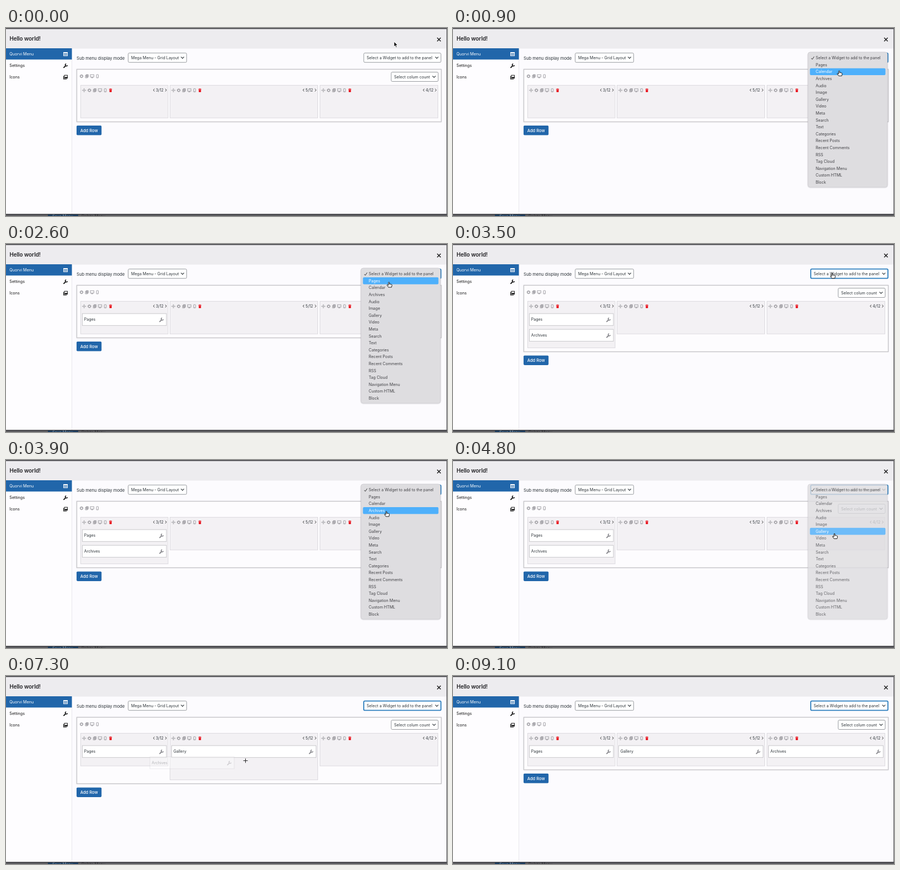
An HTML page for the animation above (9200 ms loop, 800 by 343 pixels).

```html
<!DOCTYPE html>
<html lang="en">
<head>
<meta charset="utf-8">
<title>Grid menu builder</title>
<style>
html, body { margin: 0; width: 100%; height: 100%; overflow: hidden; background: #fcfbfe; }
svg { display: block; width: 800px; height: 343px; font-family: Inter, "Open Sans", sans-serif; }
</style>
</head>
<body>
<svg id="stage" viewBox="0 0 800 343" xmlns="http://www.w3.org/2000/svg">
  <defs>
    <g id="gear" fill="none" stroke="#99989d">
      <circle r="2.1" stroke-width="1.2"/>
      <circle r="2.9" stroke-width="1" stroke-dasharray="1.15 1.13"/>
    </g>
    <g id="copy" fill="#b5b4b9" stroke="#919095" stroke-width=".8">
      <path d="M-1.2-3H2.6V1.6H-1.2Z"/>
      <path d="M-1.2-1.6H-2.6V3H1.2V1.6" fill="none"/>
    </g>
    <g id="screen" fill="none" stroke="#99989d" stroke-width=".9">
      <rect x="-3.2" y="-2.8" width="6.4" height="4.2"/>
      <path d="M0 1.4V2.8M-1.8 2.9H1.8"/>
    </g>
    <g id="phone" fill="none" stroke="#99989d" stroke-width=".9">
      <rect x="-1.8" y="-3" width="3.6" height="6" rx=".6"/>
      <path d="M-.5 1.9H.5"/>
    </g>
    <g id="grip" fill="none" stroke="#99989d" stroke-width=".8">
      <path d="M-3.2 0H3.2M0-3.2V3.2M-1-2.2L0-3.2L1-2.2M-1 2.2L0 3.2L1 2.2M-2.2-1L-3.2 0L-2.2 1M2.2-1L3.2 0L2.2 1"/>
    </g>
    <path id="bin" d="M-2.6-2.6H-1V-3.2H1V-2.6H2.6V-1.6H-2.6ZM-2.2-1.1H2.2L1.9 3.2H-1.9Z" fill="#e8121c"/>
    <g id="wrench" fill="none">
      <path d="M1.2-3.4A2 2 0 1 0 3.4-1.2" stroke-width="1.5"/>
      <path d="M.2-.2L-3.1 3.1" stroke-width="1.9" stroke-linecap="round"/>
    </g>
    <path id="arrow" d="M0 0V9L2.1 7.1L3.6 10.4L5.1 9.7L3.6 6.5H6.5Z" fill="#000" stroke="#fff" stroke-width=".8"/>
    <path id="hand" d="M-.9.8Q0-.5.9.8V4L2.2 3.7L3.5 4.1L4.8 4.5Q5.6 4.6 5.5 6L4.7 9.6H-.8L-3.4 6Q-3.6 4.6-2.3 5L-.9 6.2Z" fill="#fff" stroke="#000" stroke-width=".9" stroke-linejoin="round"/>
    <path id="move" d="M0-4.9L2-2.6H.7V-.7H2.6V-2L4.9 0L2.6 2V.7H.7V2.6H2L0 4.9L-2 2.6H-.7V.7H-2.6V2L-4.9 0L-2.6-2V-.7H-.7V-2.6H-2Z" fill="#000" stroke="#fff" stroke-width=".5"/>
    <path id="cross" d="M-4 0H4M0-4V4" stroke="#222" stroke-width="1"/>
  </defs>
  <g id="base"></g>
  <g id="live"></g>
</svg>
<script>
const LOOP = 9200, STEP = 100;
const PROMPT = "Select a Widget to add to the panel";
const OPTIONS = [PROMPT, "Pages", "Calendar", "Archives", "Audio", "Image", "Gallery", "Video", "Meta",
  "Search", "Text", "Categories", "Recent Posts", "Recent Comments", "RSS", "Tag Cloud",
  "Navigation Menu", "Custom HTML", "Block"];
const COLS = [
  { x: 135.5, r: 294, size: "3/12" },
  { x: 297.5, r: 565.5, size: "5/12" },
  { x: 569.5, r: 783.5, size: "4/12" }
];
const TOP = 104.5, PITCH = 28.7, ROW_TOP = 127;

// "-" is the empty slot under a dragged item
const LAYOUTS = [
  [0, "", "", ""], [2100, "P", "", ""], [3300, "PA", "", ""], [5300, "PAG", "", ""],
  [6000, "PA-", "", ""], [6200, "PA", "-", ""], [6500, "PA", "G", ""],
  [7000, "P-", "G", ""], [7300, "P", "G-", ""], [8100, "P", "G", "-"], [8300, "P", "G", "A"]
];
const NAMES = { P: "Pages", A: "Archives", G: "Gallery" };
const DRAGS = [
  { from: 6000, to: 6500, name: "Gallery", dx: 72, dy: 17 },
  { from: 7000, to: 8300, name: "Archives", dx: 72, dy: 10.5 }
];
const MENUS = [[600, 1500], [2300, 2800], [3700, 4700]];
const VALUES = [[0, PROMPT], [1600, "Pages"], [2100, PROMPT], [2900, "Archives"], [3300, PROMPT],
  [4900, "Gallery"], [5300, PROMPT]];
const PATH = [
  [0, 704, 25], [400, 702, 52], [600, 702, 53], [1000, 700, 86], [1300, 699, 67], [1500, 699, 67],
  [1700, 699, 54], [2300, 698, 54], [2500, 697, 58], [2800, 690, 92], [3000, 690, 92], [3400, 688, 53],
  [3700, 688, 53], [4100, 692, 134], [4900, 692, 134], [5500, 330, 185], [5800, 210, 201],
  [6000, 210, 201], [6200, 400, 152], [6500, 400, 150], [6900, 210, 166], [7000, 212, 166],
  [7200, 333, 158], [7300, 434.5, 154.5], [7700, 446, 152], [7900, 462, 150], [8200, 640, 146], [9200, 640, 146]
];
const POINTERS = [[0, "arrow"], [300, "hand"], [5100, "arrow"], [5700, "move"], [6100, "cross"], [6500, "move"],
  [7100, "cross"], [8300, "move"], [9000, ""]];

const at = (list, t) => list.filter(e => e[0] <= t).pop();
const rect = (x, y, r, b, fill, stroke = "none", w = 1, rx = 0, more = "") =>
  `<rect x="${x}" y="${y}" width="${r - x}" height="${b - y}" rx="${rx}" fill="${fill}" stroke="${stroke}" stroke-width="${w}" ${more}/>`;
const text = (x, y, s, size = 7.2, fill = "#2c3338", weight = 400) =>
  `<text x="${x}" y="${y}" font-size="${size}" fill="${fill}" font-weight="${weight}">${s}</text>`;
const icon = (id, x, y, more = "") => `<use href="#${id}" transform="translate(${x} ${y})" ${more}/>`;
const line = (d, color = "#2c3338", w = 1.1) => `<path d="${d}" fill="none" stroke="${color}" stroke-width="${w}"/>`;
const icons = (ids, x, y) => ids.map((id, i) => icon(id, x + i * 9.6, y)).join("");

function select(x, y, r, label, focus) {
  return rect(x, y, r, y + 17, "#fff", focus ? "#2b7dbd" : "#8c8f94", focus ? 1.8 : .9, 2) +
    text(x + 5.2, y + 11.4, label) +
    line(`M${r - 10.3} ${y + 7}l2.8 2.8l2.8 -2.8`);
}

function cursor(t) {
  const i = Math.max(1, PATH.findIndex(k => k[0] >= t));
  const [t0, x0, y0] = PATH[i - 1], [t1, x1, y1] = PATH[i];
  const k = (t - t0) / (t1 - t0);
  return [x0 + (x1 - x0) * k, y0 + (y1 - y0) * k];
}

function widget(x, y, r, name, opacity = 1) {
  return `<g opacity="${opacity}">` + rect(x, y, r, y + 21.7, "#fff", "#c8c7cb") +
    text(x + 3.3, y + 13.2, name, 7) + icon("wrench", r - 9, y + 11.5, 'stroke="#85858a"') + "</g>";
}

function column(c, items) {
  const bottom = Math.max(164, 132 + PITCH * items.length);
  let s = rect(c.x, TOP, c.r, bottom, "#f3f1f4", "#dcdadf");
  s += icons(["grip", "gear", "copy", "screen", "phone", "bin"], c.x + 6.2, 113.7);
  s += line(`M${c.r - 24.5} 111l-2.4 2.3l2.4 2.3M${c.r - 5.2} 111l2.4 2.3l-2.4 2.3`, "#333", 1);
  s += text(c.r - 22.2, 115.9, c.size, 7);
  [...items].forEach((id, i) => {
    if (id !== "-") s += widget(c.x + 3, ROW_TOP + i * PITCH, c.r - 3, NAMES[id]);
  });
  return s;
}

function menu(t, y) {
  const span = MENUS.find(m => t >= m[0] && t <= m[1] + 100);
  if (!span) return "";
  const pick = Math.round((y - 54.5) / 12.6);
  let s = `<g opacity="${t > span[1] ? .8 : 1}">` +
    rect(643.5, 44.5, 788.5, 291.5, "none", "#000", 2, 5, 'opacity=".07"') +
    rect(644, 44, 788, 290.5, "#dedde0", "#c6c5c9", .6, 4);
  OPTIONS.forEach((name, i) => {
    const mid = 54.5 + i * 12.6;
    if (i === pick) s += rect(647.5, mid - 6.3, 784.5, mid + 6.3, "#4eb0fb", "none", 0, 2);
    s += text(658, mid + 2.6, name, 7.1, i === pick ? "#fff" : "#3f3f43");
  });
  return s + line("M650 55l1.7 2.2l3.4 -5", pick ? "#333" : "#fff", 1) + "</g>";
}

function base() {
  let s = rect(0, 0, 800, 343, "#5b5b5f") + rect(0, 2, 799, 339.5, "#fcfbfe") +
    rect(0, 2, 799, 37.5, "#edecef") + rect(0, 37.5, 119, 339.5, "#fefdff") +
    rect(119, 37.5, 120, 339.5, "#e9e8ec") + rect(0, 37, 119.5, 57.5, "#2166aa");
  s += text(6.4, 23.4, "Hello world!", 9.8, "#1d1d20", 600) +
    line("M782.2 17.8l6.4 6.4M788.6 17.8l-6.4 6.4", "#222", 1.6);
  s += text(6.3, 49.9, "Quorvi Menu", 7.2, "#fff") + text(6.3, 71.1, "Settings", 7.2, "#111") + text(6.3, 92, "Icons", 7.2, "#111");
  s += rect(104.5, 44.5, 111.5, 50.7, "none", "#fff", 1) + rect(104.5, 44.5, 111.5, 46, "#fff") +
    line("M104.5 48.3H111.5M106.8 46V50.7M109.2 46V50.7", "#fff", .7);
  s += icon("wrench", 108, 69, 'stroke="#111"');
  s += rect(106, 86.2, 111.4, 91.6, "#fff", "#111", 1) + line("M104.6 87.5V93.2H110.2", "#111", 1.1) +
    `<path d="M106.3 91.3l1.6 -2.6l1.2 1.2l1 -1.4l1.3 2.8Z" fill="#111"/>`;
  s += text(128, 57.6, "Sub menu display mode", 7.7) + select(221.7, 45.7, 327.7, "Mega Menu - Grid Layout");
  s += rect(0, 339, 800, 340.5, "#47474b") + rect(76, 340.5, 131, 343, "#17385a") +
    text(84, 346, "Save Menu", 7.2, "#8597a8") + text(137, 346, "Delete Menu", 7.2, "#2b2b2e");
  return s;
}

function draw(t) {
  const cells = at(LAYOUTS, t).slice(1);
  const most = Math.max(...cells.map(c => c.length));
  const end = Math.max(164, 132 + PITCH * most) + 7;
  const [x, y] = cursor(t);
  let s = rect(128.5, 75.5, 789.5, end, "none", "#000", 3.4, 1, 'opacity=".06"') +
    rect(128.5, 75.5, 789.5, end, "#fdfcfe", "#c6c5c9", 1.2);
  s += icons(["gear", "copy", "screen", "phone"], 137, 88) + select(698.8, 80.5, 784, "Select colum count");
  COLS.forEach((c, i) => { s += column(c, cells[i]); });
  s += rect(128, end + 7, 173.3, end + 24.5, "#2166aa", "none", 0, 1.8) + text(134.7, end + 18.5, "Add Row", 7.5, "#fff", 500);
  s += select(649, 45.7, 789, at(VALUES, t)[1], t >= 600);

  // The dragged copy trails the pointer by one step
  const drag = DRAGS.find(d => t >= d.from && t < d.to);
  if (drag) {
    const [gx, gy] = cursor(Math.max(drag.from, t - STEP));
    const left = gx - drag.dx;
    s += widget(left, gy - drag.dy, left + 153, drag.name, .3);
  }
  s += menu(t, y);
  const pointer = at(POINTERS, t)[1];
  if (pointer) s += icon(pointer, x, y);
  return s;
}

const live = document.getElementById("live");
document.getElementById("base").innerHTML = base();
let start = null, shown = -1;
function tick(now) {
  if (start === null) start = now;
  const t = Math.floor(((now - start) % LOOP) / STEP) * STEP;
  if (t !== shown) live.innerHTML = draw(shown = t);
  requestAnimationFrame(tick);
}
live.innerHTML = draw(0);
requestAnimationFrame(tick);
</script>
</body>
</html>
```
